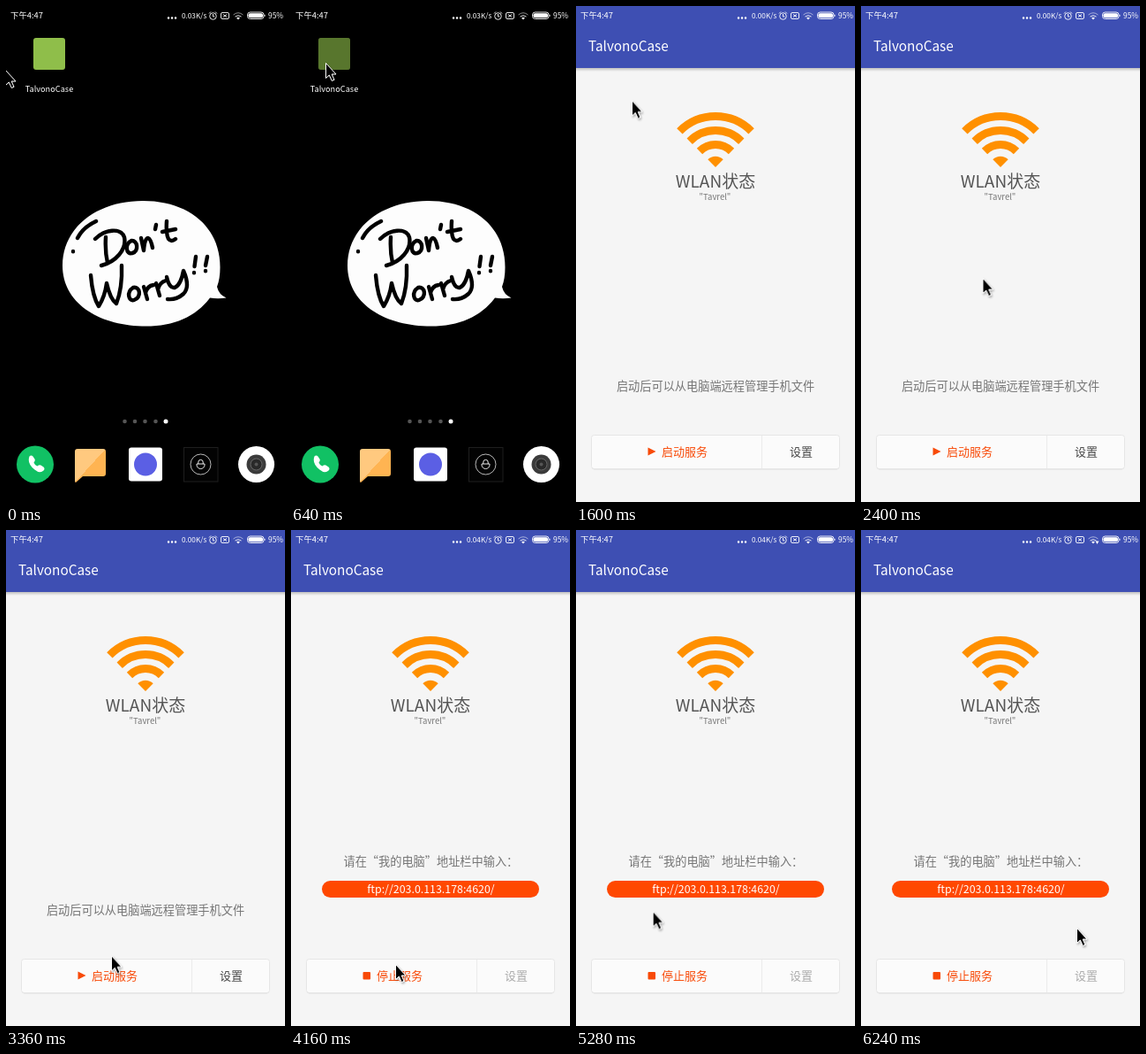
Animation of 316 by 560 pixels, one loop 6.4 s. Source, as an HTML page without scripts:

```html
<!DOCTYPE html>
<html lang="zh-CN">
<head>
<meta charset="utf-8">
<title>手机文件管理</title>
<style>
html, body { margin: 0; width: 100%; height: 100%; overflow: hidden; background: #000; }
svg { display: block; width: 100%; height: 100%; }
text { font-family: "Noto Sans CJK SC", "Noto Sans CJK", "Noto Sans", sans-serif; }
.mid { text-anchor: middle; }
.line { fill: none; stroke: #fff; }
.ink { fill: none; stroke: #000; stroke-width: 4.4; stroke-linecap: round; stroke-linejoin: round; }

/* one loop is 6400 ms, one tick of 160 ms is 2.5% */
.a { animation: 6400ms step-end infinite; }
.press { animation-name: press; }
.window { animation-name: window; transform-origin: 49px 54px; }
.app { animation-name: app; }
.before { animation-name: before; }
.after { animation-name: after; }
.speed1 { animation-name: speed1; }
.speed2 { animation-name: speed2; }
.speed3 { animation-name: after; }
.traffic { animation-name: traffic; }
.cursor { animation-name: cursor; }

@keyframes press { 0% { opacity: 0 } 10%, 100% { opacity: .38 } }
@keyframes window {
  0% { opacity: 0; transform: scale(.1) }
  12.5% { opacity: .9; transform: scale(.6) }
  15%, 100% { opacity: 1; transform: none }
}
@keyframes app { 0% { opacity: 0 } 22.5% { opacity: .67 } 25%, 100% { opacity: 1 } }
@keyframes before { 0% { opacity: 1 } 65%, 100% { opacity: 0 } }
@keyframes after { 0% { opacity: 0 } 65%, 100% { opacity: 1 } }
@keyframes speed1 { 0% { opacity: 1 } 22.5%, 100% { opacity: 0 } }
@keyframes speed2 { 0% { opacity: 0 } 22.5% { opacity: 1 } 65%, 100% { opacity: 0 } }
@keyframes traffic {
  0%, 50%, 62.5%, 82.5% { opacity: 0 }
  45%, 55%, 77.5%, 95%, 100% { opacity: 1 }
}
@keyframes cursor {
  0% { transform: translate(-1px, 72px); animation-timing-function: steps(4) }
  10% { transform: translate(39px, 64px) }
  22.5% { transform: translate(39px, 64px); animation-timing-function: steps(4) }
  32.5% { transform: translate(135px, 234px); animation-timing-function: steps(4) }
  42.5% { transform: translate(140px, 380px); animation-timing-function: steps(3) }
  50% { transform: translate(116px, 487px); animation-timing-function: steps(3) }
  57.5% { transform: translate(125px, 467px); animation-timing-function: steps(2) }
  62.5% { transform: translate(118px, 490px) }
  67.5% { transform: translate(118px, 490px); animation-timing-function: steps(2) }
  72.5% { transform: translate(113px, 424px); animation-timing-function: steps(3) }
  80% { transform: translate(81px, 402px); animation-timing-function: steps(3) }
  87.5% { transform: translate(98px, 487px) }
  90% { transform: translate(98px, 487px); animation-timing-function: steps(3) }
  97.5%, 100% { transform: translate(244px, 449px) }
}
</style>
</head>
<body>
<svg viewBox="0 0 316 560">
  <defs>
    <linearGradient id="note" x2="1" y2="1">
      <stop offset=".5" stop-color="#ffc97f"/>
      <stop offset=".5" stop-color="#ffb452"/>
    </linearGradient>
    <linearGradient id="shade" x2="0" y2="1">
      <stop stop-color="#000" stop-opacity=".22"/>
      <stop offset="1" stop-color="#000" stop-opacity="0"/>
    </linearGradient>
    <filter id="soft" x="-50%" y="-50%" width="200%" height="200%">
      <feDropShadow dx="1" dy="1.5" stdDeviation="1" flood-opacity=".35"/>
    </filter>
  </defs>

  <!-- home screen -->
  <rect width="316" height="560"/>
  <rect x="31" y="36" width="36" height="36" rx="3" fill="#8fbe4a"/>
  <rect class="a press" x="31" y="36" width="36" height="36" rx="3"/>
  <text class="mid" x="49" y="96.500" font-size="9.200" fill="#fff">TalvonoCase</text>

  <path fill="#fdfdfd" d="M64 293C64 250 103 220 155 220C208 220 242.500 250 242.500 295Q242.500 308 239 317Q241 326 249.500 329.500Q240 331 231 329.500C214 352 188 362.500 154 361.500C104 360 64 335 64 293Z"/>
  <g class="ink">
    <path d="M81 262Q87 250 102 243M76 277v.2"/>
    <path d="M113 261Q112 277 115 290M101 263C112 252 130 250 134 261C137 275 124 289 108 293"/>
    <path d="M142 265C134 269 136 281 143 279C151 277 149 264 142 265"/>
    <path d="M153 262L156 276Q157 262 161 262Q164 263 166 273"/>
    <path d="M170 247L169 252M182 243Q181 257 184 263Q187 267 192 263M177 255L192 252"/>
    <path d="M96 304Q98 328 105 339Q112 328 114 313Q118 331 125 336Q132 318 131 293"/>
    <path d="M144 318C136 323 139 334 145 332C154 329 152 316 144 318"/>
    <path d="M156 317L160 331M158 324Q160 316 167 315M170 313L174 327M172 320Q174 312 181 310"/>
    <path d="M182 306Q185 319 191 318Q198 315 201 299Q209 317 201 325Q193 332 183 331"/>
    <path d="M215 283L213.500 294M213 301v.2M228 283L226 293M226 299v.2"/>
  </g>

  <g fill="#555">
    <circle cx="134.500" cy="469" r="2.300"/>
    <circle cx="146" cy="469" r="2.300"/>
    <circle cx="157.500" cy="469" r="2.300"/>
    <circle cx="169.500" cy="469" r="2.300"/>
    <circle cx="181" cy="469" r="2.500" fill="#fff"/>
  </g>

  <circle cx="33" cy="517.500" r="21" fill="#11c164"/>
  <path fill="#fff" d="M26.500 508.500q2-2 4 0l2 3q1 2-1 4q1 3 4 4q2-2 4-1l3 2q2 2 0 4q-4 4-10-1q-9-7-6-15Z"/>
  <path fill="url(#note)" d="M81 500h29q3 0 3 3v25q0 3-3 3H87l-8 7q-1 0-1-2V503q0-3 3-3Z"/>
  <rect x="139" y="498.500" width="38" height="38" rx="3" fill="#fff"/>
  <circle cx="158" cy="517.500" r="13" fill="#5b5fe4"/>
  <rect x="201.500" y="498.500" width="38.500" height="38.500" fill="#030303" stroke="#1e1e1e"/>
  <g class="line" stroke-width=".9">
    <circle cx="220.500" cy="517.500" r="11.500" opacity=".8"/>
    <path d="M216 517h9v1a4.500 4.500 0 0 1-9 0ZM217.800 517v-2a2.700 2.700 0 0 1 5.400 0v2"/>
  </g>
  <circle cx="283.500" cy="517.500" r="20.500" fill="#fff"/>
  <circle cx="283.500" cy="517.500" r="11" fill="#3b3b3b"/>
  <circle cx="283.500" cy="517.500" r="6.500" fill="#292929" stroke="#666"/>
  <circle cx="283.500" cy="517.500" r="2" fill="#555"/>

  <!-- app -->
  <rect class="a window" width="316" height="560" fill="#fafafa"/>
  <g class="a app">
    <rect width="316" height="560" fill="#f5f5f5"/>
    <rect y="70" width="316" height="4" fill="url(#shade)"/>
    <rect width="316" height="70" fill="#3e4fb3"/>
    <text x="14" y="51" font-size="15.300" fill="#fff">TalvonoCase</text>

    <g transform="translate(158 182)" fill="none" stroke="#ff9000" stroke-width="9">
      <path d="M-40.600-40.600A57.500 57.500 0 0 1 40.600-40.600"/>
      <path d="M-29.300-29.300A41.500 41.500 0 0 1 29.300-29.300"/>
      <path d="M-18-18A25.500 25.500 0 0 1 18-18"/>
      <path d="M0 0L-8.700-8.700A12.300 12.300 0 0 1 8.700-8.700Z" fill="#ff9000" stroke="none"/>
    </g>
    <text class="mid" x="158" y="204.500" font-size="19" fill="#555">WLAN状态</text>
    <text class="mid" x="157.500" y="219" font-size="9.500" fill="#777">"Tavrel"</text>

    <rect x="18" y="485" width="280" height="38.500" rx="3" fill="#000" opacity=".1"/>
    <rect x="17.500" y="484.500" width="281" height="38" rx="3" fill="#fbfbfb" stroke="#e6e6e6"/>
    <path d="M210.500 485v37" stroke="#ebebeb"/>

    <g class="a before" font-size="13">
      <text class="mid" x="158" y="434" font-size="13.200" fill="#757575">启动后可以从电脑端远程管理手机文件</text>
      <path d="M81.500 498.500L90.500 503L81.500 507.500Z" fill="#f84a08"/>
      <text x="97" y="508" fill="#f84a08" font-weight="500">启动服务</text>
      <text class="mid" x="255" y="508" fill="#444">设置</text>
    </g>
    <g class="a after" font-size="13">
      <text x="59.500" y="379" font-size="13.200" fill="#757575">请在“我的电脑”地址栏中输入：</text>
      <rect x="35" y="396" width="246" height="19" rx="9.500" fill="#ff4800"/>
      <text class="mid" x="158.500" y="410" font-size="12.400" fill="#fff">ftp://203.0.113.178:4620/</text>
      <rect x="81.500" y="499" width="8.500" height="8.500" rx="1" fill="#f84a08"/>
      <text x="97" y="508" fill="#f84a08" font-weight="500">停止服务</text>
      <text class="mid" x="255" y="508" fill="#aaa">设置</text>
    </g>
  </g>

  <!-- status bar -->
  <g fill="#fff" font-size="8.200">
    <text x="5" y="14" font-size="9.400">下午4:47</text>
    <path d="M184 13.500h.1M188 13.500h.1M192 13.500h.1" stroke="#fff" stroke-width="2.400" stroke-linecap="round"/>
    <text class="a speed1" x="199" y="14">0.03K/s</text>
    <text class="a speed2" x="199" y="14">0.00K/s</text>
    <text class="a speed3" x="199" y="14">0.04K/s</text>
    <g class="line" stroke-width=".9">
      <circle cx="234.500" cy="11.500" r="3.800"/>
      <path d="M234.500 9v3h2M230 8.500l2-2M239 8.500l-2-2"/>
      <rect x="243.500" y="7.500" width="9" height="7" rx="1.500"/>
      <path d="M246 9.500l4 3M250 9.500l-4 3"/>
      <path d="M257.500 10q5.500-4.500 11 0" opacity=".6"/>
      <path d="M259.500 12q3.500-2.500 7 0"/>
      <rect x="273.500" y="7" width="18.500" height="7.500" rx="3"/>
    </g>
    <path d="M261 13.300q2-1.300 4 0l-2 2.200Z"/>
    <path class="a traffic" d="M265.500 12.500h4l-2 3.500Z"/>
    <rect x="274.500" y="8.200" width="16.500" height="5.100" rx="2"/>
    <rect x="292.500" y="9.800" width="1" height="2"/>
    <text x="297" y="14" font-size="8.400">95%</text>
  </g>

  <g class="a cursor">
    <path d="M.5 .5V17.500L4.300 14L7.300 20.500L10 19.300L7.200 13H12Z" stroke="#fff" filter="url(#soft)"/>
  </g>
</svg>
</body>
</html>
```
